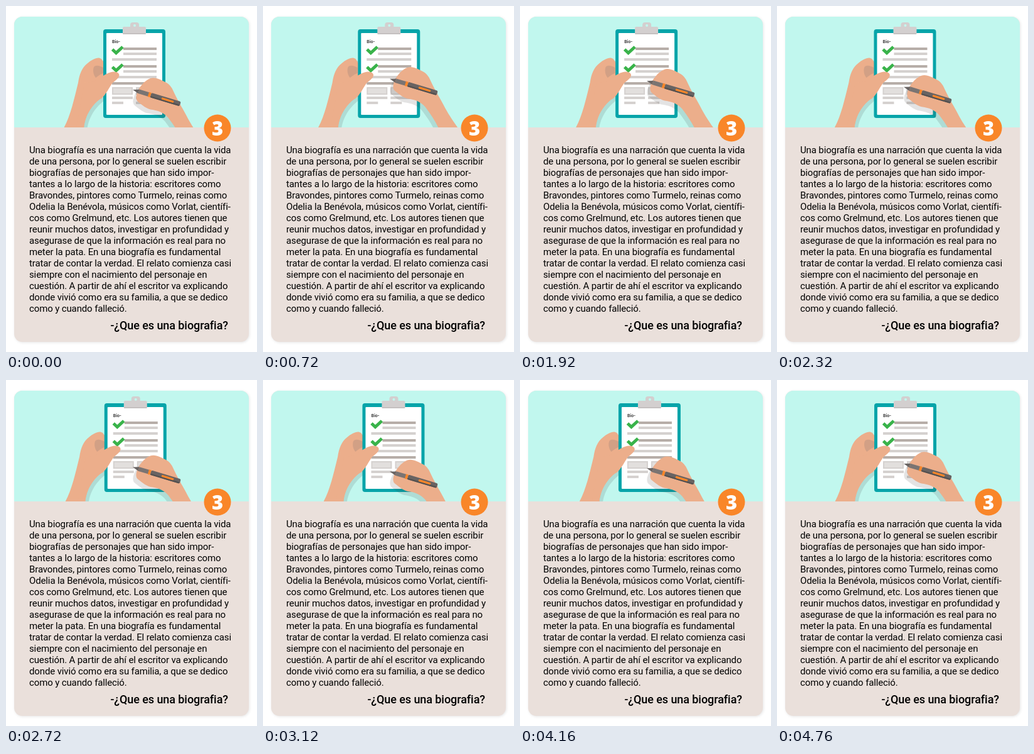
Write an HTML page with a canvas that moves like this. It is 400 px wide and 550 px high and loops after 4800 ms.

```html
<!DOCTYPE html>
<html lang="es">
<head>
<meta charset="utf-8">
<title>¿Qué es una biografía?</title>
<style>
html, body { margin: 0; width: 100%; height: 100%; overflow: hidden; background: #fff; }
canvas { display: block; width: 400px; height: 550px; }
</style>
</head>
<body>
<canvas id="stage" width="400" height="550"></canvas>
<script>
const ctx = document.getElementById('stage').getContext('2d');
const LOOP = 4800, STEP = 40;
const SKIN = '#ecae8b', SKIN_DARK = '#d2a085', SHADE = 'rgba(60,60,60,.14)';
const TEAL = '#07a4a9', LIGHT = '#d5d1cf', MID = '#b7aea8';
const GREEN = '#39b34a', ORANGE = '#f98629', PEN = '#686362';

const LINES = [
  'Una biografía es una narración que cuenta la vida',
  'de una persona, por lo general se suelen escribir',
  'biografías de personajes que han sido impor-',
  'tantes a lo largo de la historia: escritores como',
  'Bravondes, pintores como Turmelo, reinas como',
  'Odelia la Benévola, músicos como Vorlat, científi-',
  'cos como Grelmund, etc. Los autores tienen que',
  'reunir muchos datos, investigar en profundidad y',
  'asegurase de que la información es real para no',
  'meter la pata. En una biografía es fundamental',
  'tratar de contar la verdad. El relato comienza casi',
  'siempre con el nacimiento del personaje en',
  'cuestión. A partir de ahí el escritor va explicando',
  'donde vivió como era su familia, a que se dedico',
  'como y cuando falleció.'
];

const shapes = {
  leftArm: 'M92 194C103 174 108 150 115 122C117 108 121 98 130 91C138 84 147 80 152 84C156 89 158 95 160 100L160 140C142 152 127 168 124 194Z',
  leftPalm: 'M140 97C143 93 150 95 155 98L155 107C150 108 146 112 143 114C139 109 138 102 140 97Z',
  thumb: 'M125 122C142 122 150 113 160 108C168 104 176 103 180 108C182 113 176 117 170 122C164 130 160 140 152 147C138 154 127 168 124 194L112 194Z',
  rightHand: 'M208 141C211 130 220 119 230 115C238 112 248 118 254 121C262 125 265 131 268 138C275 153 283 165 290 179C296 190 304 202 322 227L287 227C280 210 271 194 261 181C255 172 246 167 234 165C224 164 218 158 210 152C207 149 207 145 208 141Z',
  nib: 'M0 0L10 -3.2L10 3.2Z'
};
for (const name in shapes) shapes[name] = new Path2D(shapes[name]);

function fill(path, color) {
  ctx.fillStyle = color;
  ctx.fill(path);
}

function rect(x, y, w, h, color, r = 0) {
  ctx.fillStyle = color;
  ctx.beginPath();
  ctx.roundRect(x, y, w, h, r);
  ctx.fill();
}

function dot(x, y, r, color) {
  ctx.fillStyle = color;
  ctx.beginPath();
  ctx.arc(x, y, r, 0, 7);
  ctx.fill();
}

function text(str, x, y, font, color, align = 'left', tracking = 0) {
  ctx.font = font;
  ctx.letterSpacing = tracking + 'px';
  ctx.fillStyle = color;
  ctx.textAlign = align;
  ctx.fillText(str, x, y);
}

function polyline(points, width, color) {
  ctx.strokeStyle = color;
  ctx.lineWidth = width;
  ctx.beginPath();
  points.forEach(([x, y]) => ctx.lineTo(x, y));
  ctx.stroke();
}

function shifted(x, y, draw) {
  ctx.save();
  ctx.translate(x, y);
  draw();
  ctx.restore();
}

// Eases from rest to the high pose, down to the low pose and back to rest.
function sway(t, high, low) {
  const keys = [[0, 0], [1120, high], [3500, low], [LOOP, 0]];
  const i = keys.findIndex(key => t < key[0]);
  const [t0, a] = keys[i - 1], [t1, b] = keys[i];
  return a + (b - a) * (1 - Math.cos(Math.PI * (t - t0) / (t1 - t0))) / 2;
}

function drawClipboard() {
  rect(155, 37, 99, 141, TEAL, 4);
  rect(160, 43, 89, 130, '#fff', 1);
  rect(198, 26, 14, 12, '#d3cfcf', 4);
  dot(205, 31, 2, '#c3f7ef');
  rect(186, 33, 37, 12, '#d3cfcf', 2);
  rect(186, 43, 37, 2, '#c4c0c0', 1);
  text('Bio-', 169, 59, 'bold 7px Roboto, sans-serif', '#444');

  for (const y of [66, 94]) {
    rect(187, y, 53, 4, MID);
    rect(187, y + 8, 53, 4, LIGHT);
    rect(169, y + 17, 71, 4, LIGHT);
    polyline([[169.5, y + 3], [175.5, y + 8.5], [186, y - 1]], 5, GREEN);
  }
  rect(169, 121, 71, 4, MID);
  for (const x of [169, 207]) {
    rect(x, 129, 33, 12, LIGHT);
    rect(x + 2, 131, 29, 8, '#e2dfdd');
    rect(x, 144, 33, 4, LIGHT);
    rect(x, 152, 18, 4, LIGHT);
  }
}

function drawPen() {
  ctx.save();
  ctx.translate(202, 133);
  ctx.rotate(Math.atan2(23, 77));
  fill(shapes.nib, PEN);
  rect(10, -3.4, 17, 6.8, '#7a7472');
  rect(26, -3.8, 4, 7.6, ORANGE);
  rect(30, -3.8, 49, 7.6, PEN, 2);
  rect(30, 1.6, 48, 2.2, '#53504f', 1);
  rect(48, -1.6, 20, 3.2, ORANGE, 1);
  ctx.restore();
}

function drawScene(t) {
  const boardX = sway(t, -5.2, 4);
  const leftX = sway(t, -6.2, 4.8);
  const penY = sway(t, -24, 15);

  shifted(leftX + 5, 4, () => fill(shapes.leftArm, SHADE));
  shifted(leftX, 0, () => {
    fill(shapes.leftArm, SKIN);
    fill(shapes.leftPalm, SKIN_DARK);
  });
  shifted(boardX, 0, drawClipboard);
  shifted(leftX, 0, () => fill(shapes.thumb, SKIN));
  shifted(-5, penY + 6, () => fill(shapes.rightHand, SHADE));
  shifted(0, penY, () => {
    fill(shapes.rightHand, SKIN);
    drawPen();
  });
}

function drawCard() {
  ctx.clearRect(0, 0, 400, 550);
  ctx.save();
  ctx.shadowColor = 'rgba(0,0,0,.1)';
  ctx.shadowBlur = 4;
  ctx.shadowOffsetX = ctx.shadowOffsetY = 1;
  rect(13, 17, 374, 517, '#eae0db', 13);
  ctx.restore();
  rect(13, 17, 374, 176, '#c1f7ee', [13, 13, 0, 0]);
}

function drawText() {
  dot(337, 194, 21.5, ORANGE);
  text('3', 337, 206, '800 31px "Open Sans", sans-serif', '#fff', 'center');
  LINES.forEach((line, i) =>
    text(line, 37, 234 + 18 * i, '15px Roboto, sans-serif', '#000', 'left', -0.13));
  text('-¿Que es una biografia?', 354, 514, '500 18px Roboto, sans-serif', '#000', 'right', -0.08);
}

function frame(now) {
  const t = Math.floor(now % LOOP / STEP) * STEP;
  drawCard();
  ctx.save();
  ctx.beginPath();
  ctx.rect(13, 17, 374, 176);
  ctx.clip();
  drawScene(t);
  ctx.restore();
  drawText();
  requestAnimationFrame(frame);
}
requestAnimationFrame(frame);
</script>
</body>
</html>
```
